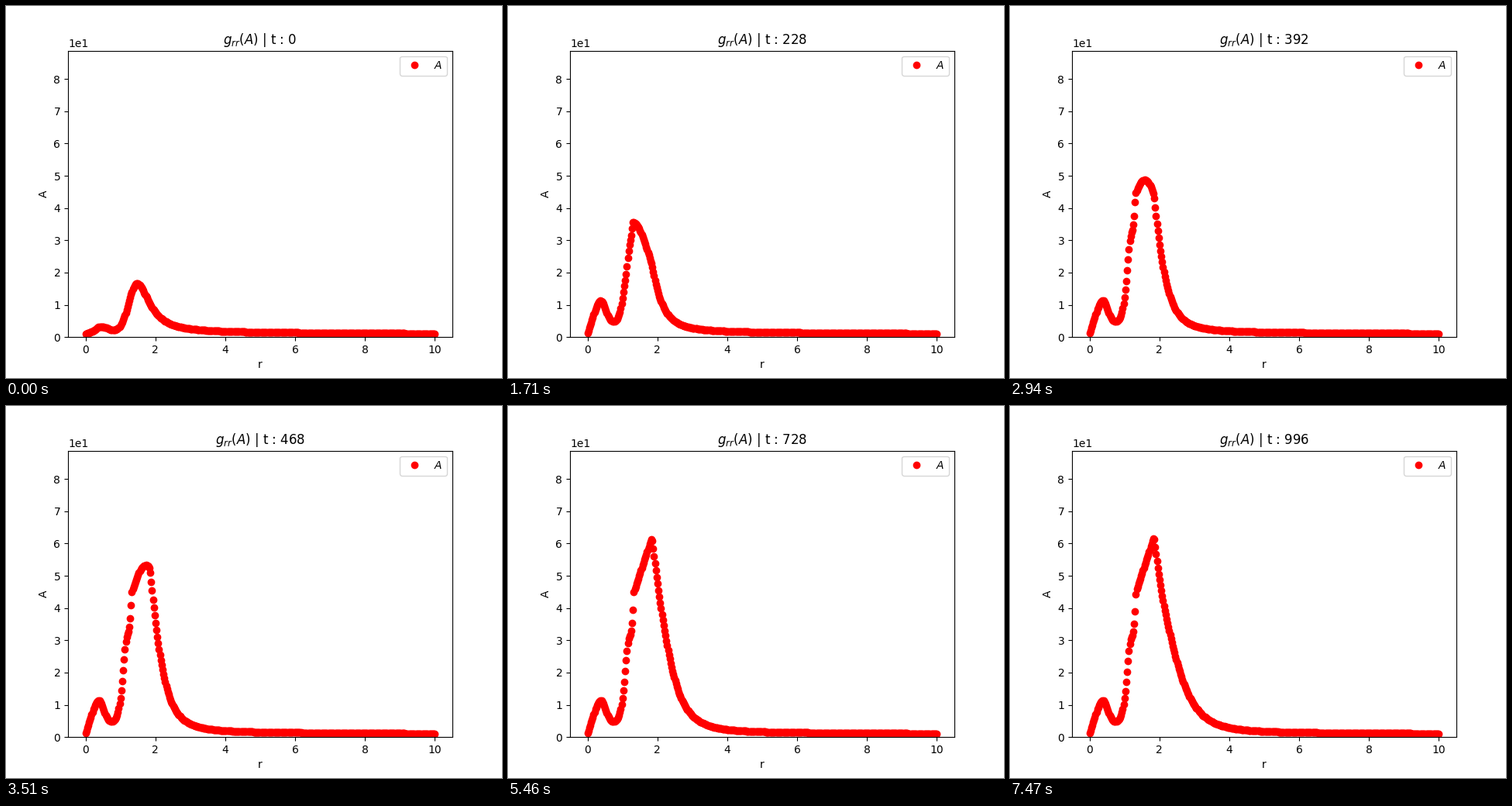
Write a matplotlib script that moves like this. It is 640 px wide and 480 px high and loops after 7500 ms.

```python
import numpy as np
import matplotlib.pyplot as plt
from matplotlib.animation import FuncAnimation

FRAMES, INTERVAL, STEP = 250, 30, 4

r = np.linspace(0, 10, 400)


def gauss(center, width):
    return np.exp(-.5 * ((r - center) / width) ** 2)


def lorentz(center, width):
    return 1 / (1 + ((r - center) / width) ** 2)


def skewed(center, left, right):
    """Join two unit peaks that share a centre."""
    return np.where(r < center, left, right)


# Initial metric: sloping floor, small inner bump, main peak with a long tail
start = (np.minimum(1 + 2.5 * r, 1.535 - .05 * r)
         + 1.75 * skewed(.43, gauss(.43, .12), gauss(.43, .22))
         + 15.15 * skewed(1.47, gauss(1.47, .235), lorentz(1.47, .445)))

# Parts of the frozen metric
inner = 10.7 * skewed(.38, gauss(.38, .21), lorentz(.38, .21))
shoulder = 20 * skewed(1.15, lorentz(1.15, .135), gauss(1.15, .09))
falloff = 1 + 384 / np.maximum(r, .5) ** 3

# Time each radius takes to freeze: short near the centre, longer outside
freeze = (np.maximum(120, 385 + 490 * (r - 2) + 190 * np.hypot(r - 2.1, .3))
          + 65 * gauss(1.1, .07))


def frozen(t):
    """Final metric, with a steep front that drifts slightly outward."""
    front = 1.414 - .05 * np.exp(-t / 230)
    rise = 1 / (1 + np.exp(-13 * (r - front)))
    return np.minimum(inner + shoulder + falloff * rise, 1.2 + 33 * r)


def metric(t):
    grown = 1 - np.exp(-(t / freeze) ** 2.55)
    return start + (frozen(t) - start) * grown


fig, ax = plt.subplots(figsize=(6.4, 4.8), dpi=100)
line, = ax.plot(r, start, "ro", label="$A$")
ax.set_xlim(-.5, 10.5)
ax.set_ylim(0, 88.8)
ax.set_xlabel("r")
ax.set_ylabel("A")
ax.ticklabel_format(axis="y", style="sci", scilimits=(0, 0))
ax.legend(loc="upper right")
title = ax.set_title("")


def update(frame):
    t = frame * STEP
    line.set_ydata(metric(t))
    title.set_text(f"$g_{{rr}}(A)$ | t : {t}")
    return line, title


anim = FuncAnimation(fig, update, frames=FRAMES, interval=INTERVAL,
                     repeat=True, repeat_delay=0)
plt.show()
```
